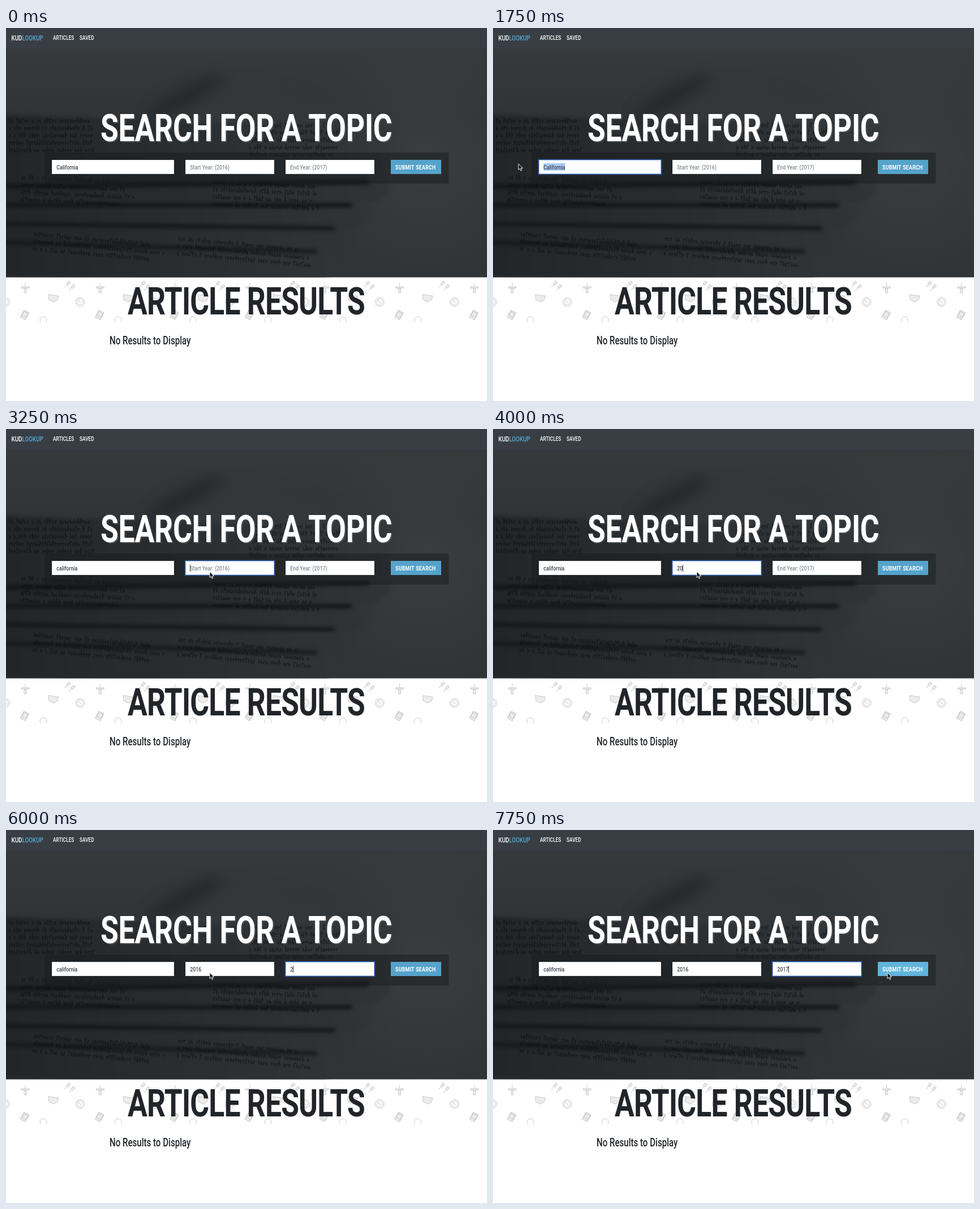
Write an HTML page with a canvas that moves like this. It is 850 px wide and 659 px high and loops after 8 s.

```html
<!DOCTYPE html>
<html lang="en">
<head>
<meta charset="utf-8">
<title>Article search</title>
<style>
html, body { margin: 0; width: 100%; height: 100%; overflow: hidden; background: #fff; }
canvas { display: block; width: 850px; height: 659px; }
</style>
</head>
<body>
<canvas id="stage" width="850" height="659"></canvas>
<script>
const W = 850, H = 659, LOOP = 8000, TICK = 250, BLINK = 500;
const NARROW = 0.765; // condensed setting shared by all text
const TAU = Math.PI * 2;
const stage = document.getElementById('stage').getContext('2d');

// A field gains focus, then its word is typed between "from" and "to".
const FIELDS = [
  { x: 81, w: 216, value: 'California', hint: '', word: 'california', focus: 1250, from: 2250, to: 2250 },
  { x: 317, w: 157, value: '', hint: 'Start Year: (2016)', word: '2016', focus: 3250, from: 3500, to: 4500 },
  { x: 494, w: 157, value: '', hint: 'End Year: (2017)', word: '2017', focus: 5000, from: 6000, to: 6750 }
];

const GLIDES = [
  { from: 500, to: 1250, x: 152, y: 246, size: 0.72 },
  { from: 1500, to: 1750, x: 45, y: 240, size: 0.72 },
  { from: 2250, to: 2750, x: 362.5, y: 249, size: 2 },
  { from: 2750, to: 3000, x: 360, y: 252, size: 0.72 },
  { from: 7250, to: 7750, x: 697, y: 252, size: 0.72 }
];

const mix = (a, b, k) => a + (b - a) * k;
const within = (t, a, b) => t >= a && t < b;

function ease(t, a, b) {
  const k = Math.min(1, Math.max(0, (t - a) / (b - a)));
  return k * k * (3 - 2 * k);
}

function seeded(seed) {
  return () => (seed = (seed * 16807) % 2147483647) / 2147483647;
}

function setFont(g, size, weight, spacing = 0) {
  g.font = `${weight} ${size}px Roboto, "Open Sans", sans-serif`;
  g.letterSpacing = spacing + 'px';
}

function text(g, str, x, y, size, color, weight = 500, spacing = 0) {
  g.save();
  g.translate(x, y);
  g.scale(NARROW, 1);
  setFont(g, size, weight, spacing);
  g.fillStyle = color;
  g.fillText(str, 0, 0);
  const width = g.measureText(str).width * NARROW;
  g.restore();
  return width;
}

// One paper layer between a left and a right edge, lit towards the right.
function sheet(g, left, right, reach, depth, light) {
  const fill = g.createLinearGradient(0, 0, reach, 0);
  fill.addColorStop(0, '#222629');
  fill.addColorStop(1, light);
  g.fillStyle = fill;
  g.beginPath();
  g.moveTo(-20, left);
  g.lineTo(reach, right);
  g.quadraticCurveTo(reach + 12, right + depth / 2, reach - 25, right + depth);
  g.lineTo(-20, left + depth);
  g.fill();
}

// Blurred print: rows of small strokes grouped into words.
function print(g, x, y, w, rows, tilt) {
  const rnd = seeded(Math.round(x * 31 + y * 17)), size = 9;
  g.save();
  g.translate(x, y);
  g.rotate(tilt);
  g.strokeStyle = 'rgba(10,12,14,.42)';
  g.lineWidth = 1.8;
  g.beginPath();
  for (let r = 0; r < rows; r++) {
    const end = w * mix(0.85, 1, rnd());
    for (let px = 0; px < end; px += size * (rnd() < 0.2 ? 1 : 0.5)) {
      const tall = size * (rnd() < 0.25 ? 0.9 : 0.6);
      g.moveTo(px, r * 13);
      g.lineTo(px, r * 13 - tall);
      g.lineTo(px + 3, r * 13 - tall * rnd());
    }
  }
  g.stroke();
  g.restore();
}

function photo(g) {
  g.save();
  g.beginPath();
  g.rect(0, 36, W, 404.5);
  g.clip();

  const sky = g.createLinearGradient(0, 36, 0, 440);
  sky.addColorStop(0, '#363a3d');
  sky.addColorStop(0.3, '#303437');
  sky.addColorStop(1, '#303437');
  g.fillStyle = sky;
  g.fillRect(0, 36, W, 405);
  const glow = g.createRadialGradient(740, 230, 10, 740, 230, 220);
  glow.addColorStop(0, 'rgba(66,70,73,.5)');
  glow.addColorStop(1, 'rgba(66,70,73,0)');
  g.fillStyle = glow;
  g.fillRect(400, 36, 450, 405);

  // far roll and its shadow
  g.filter = 'blur(10px)';
  g.fillStyle = '#33373a';
  g.beginPath();
  g.moveTo(240, 170);
  g.bezierCurveTo(300, 60, 420, 70, 690, 180);
  g.lineTo(640, 290);
  g.fill();
  g.fillStyle = '#262a2d';
  g.beginPath();
  g.ellipse(315, 122, 75, 17, -0.5, 0, TAU);
  g.fill();

  // stack, with a dark crease above each layer
  g.filter = 'blur(3px)';
  sheet(g, 152, 178, 655, 130, '#33373a');
  for (let i = 0; i < 4; i++) {
    const left = 280 + 33 * i, right = 272 + 41 * i, reach = 675 - 32 * i;
    sheet(g, left, right, reach, 36 + 8 * i, '#303437');
    g.strokeStyle = '#14171a';
    g.lineWidth = 9 - i;
    g.beginPath();
    g.moveTo(0, left);
    g.lineTo(reach * 0.95, right);
    g.stroke();
  }

  g.filter = 'blur(0.7px)';
  for (let band = 0; band < 3; band++) {
    for (let col = 0; col < 2; col++) {
      print(g, 6 + 22 * band + col * (425 - 85 * band), 168 + 100 * band + 8 * col,
        mix(165, 240, band / 2), 5 - band, 0.045 * band);
    }
  }
  g.restore();
}

function icon(g, x, y, turn, draw) {
  g.save();
  g.translate(x, y);
  g.rotate(turn);
  g.beginPath();
  draw();
  g.fill();
  g.stroke();
  g.restore();
}

function tile(g, x) {
  g.strokeStyle = '#cbcbcb';
  g.fillStyle = '#ececec';
  g.lineWidth = 1;
  icon(g, x + 34, 459, 0, () => { // lamp
    g.moveTo(0, -9);
    g.lineTo(0, -3);
    g.rect(-7, -2, 14, 2.5);
    g.rect(-2, 1, 4, 8);
  });
  for (let i = 0; i < 2; i++) { // brushes
    icon(g, x + 109 + 8 * i, 452 + 6 * i, 0.75, () => {
      g.rect(-2, -5, 4, 6);
      g.moveTo(0, 1);
      g.lineTo(0, 8);
    });
  }
  icon(g, x + 83, 477, 0.15, () => { // map
    g.moveTo(-9, -5);
    g.lineTo(9, -5);
    g.lineTo(8, 2);
    g.lineTo(2, 7);
    g.lineTo(-7, 4);
    g.closePath();
  });
  icon(g, x + 33, 507, 0.5, () => { // device
    g.rect(-5, -7, 10, 14);
    g.rect(-4, -5, 8, 8);
  });
  g.fillStyle = '#fff';
  icon(g, x + 131, 484, 0, () => g.arc(0, 0, 8, 0, TAU)); // gauge
  icon(g, x + 131, 484, 0.75, () => {
    g.arc(0, 0, 5.5, 0, TAU);
    g.moveTo(-5, 0);
    g.lineTo(3, 0);
  });
  icon(g, x + 66, 516, 0, () => g.arc(0, 0, 6, 0, TAU)); // bulb
}

function backdrop() {
  const page = document.createElement('canvas');
  page.width = W;
  page.height = H;
  const g = page.getContext('2d');
  g.fillStyle = '#fff';
  g.fillRect(0, 0, W, H);
  photo(g);

  g.fillStyle = '#383e44';
  g.fillRect(0, 0, W, 36);
  const used = text(g, 'KUD', 9.5, 22, 12.8, '#fff');
  text(g, 'LOOKUP', 9.5 + used, 22, 12.8, '#56a8d2');
  text(g, 'ARTICLES', 83, 21, 10.8, '#fff');
  text(g, 'SAVED', 130, 21, 10.8, '#fff');

  g.fillStyle = 'rgba(26,28,31,.5)';
  g.fillRect(68, 220, 714.5, 55);
  g.save();
  g.shadowColor = 'rgba(70,75,80,.9)';
  g.shadowOffsetX = g.shadowOffsetY = 2;
  g.shadowBlur = 1;
  text(g, 'SEARCH FOR A TOPIC', 167, 200, 67.5, '#fff', 700, -0.2);
  g.restore();

  g.save();
  g.beginPath();
  g.rect(0, 441, W, 79);
  g.clip();
  for (let k = -1; k < 7; k++) tile(g, k * 132.3);
  g.restore();
  text(g, 'ARTICLE RESULTS', 215, 506, 67.5, '#212529', 700, -1.05);
  text(g, 'No Results to Display', 183, 559, 19.7, '#212529');
  return page;
}

// Typing starts slowly and speeds up.
function typed(f, t) {
  if (t < f.from) return f.value;
  const k = Math.min(1, (t - f.from + TICK) / (f.to - f.from + TICK));
  return f.word.slice(0, Math.ceil(f.word.length * k * k));
}

function caretOn(f, t) {
  if (within(t, f.from, f.to)) return true;
  const since = t < f.from ? f.focus : f.to;
  return Math.floor((t - since) / BLINK) % 2 === 0;
}

function drawField(g, f, t, focused) {
  if (focused) {
    g.fillStyle = '#28498a';
    g.fillRect(f.x - 1.5, 231.5, f.w + 3, 28);
  }
  g.fillStyle = '#fff';
  g.fillRect(f.x, 233, f.w, 25);
  g.strokeStyle = focused ? '#9dbfea' : '#e6eaed';
  g.lineWidth = 1;
  g.strokeRect(f.x + 0.5, 233.5, f.w - 1, 24);

  const value = typed(f, t), x = f.x + 8.3, size = 11.5;
  const selected = focused && value && within(t, f.focus + BLINK, f.from);
  setFont(g, size, 500);
  const width = g.measureText(value).width * NARROW;
  if (selected) {
    g.fillStyle = '#a9cbf5';
    g.fillRect(x, 239, width, 13);
  }
  text(g, value || f.hint, x, 249.5, size, value ? '#40464c' : '#858c93');
  if (focused && !selected && caretOn(f, t)) {
    g.fillStyle = '#333';
    g.fillRect(Math.round(x + width), 240, 1, 12);
  }
}

function pointerAt(t) {
  const p = { x: 290, y: 184, size: 0.72 };
  for (const m of GLIDES) {
    const k = ease(t, m.from, m.to);
    for (const key in p) p[key] = mix(p[key], m[key], k);
  }
  return p;
}

function drawPointer(g, { x, y, size }) {
  g.save();
  g.translate(x, y);
  g.scale(size, size);
  g.fillStyle = '#111';
  g.strokeStyle = '#fff';
  g.lineWidth = 1.3;
  const arrow = new Path2D('M0 0V14.5L3.3 11.5L5.7 17L8 16L5.8 10.6H10.5Z');
  g.fill(arrow);
  g.stroke(arrow);
  g.restore();
}

const back = backdrop();

function draw(now) {
  const t = Math.floor((now % LOOP) / TICK) * TICK, g = stage;
  const active = FIELDS.filter(f => t >= f.focus).pop();
  const p = pointerAt(t);
  g.drawImage(back, 0, 0);
  for (const f of FIELDS) drawField(g, f, t, f === active);
  g.fillStyle = p.x > 680 ? '#61b4dd' : '#55a3cb';
  g.fillRect(680, 233, 89, 25);
  text(g, 'SUBMIT SEARCH', 688, 249.5, 11.5, '#fff', 700, 0.3);
  // the pointer hides while the topic is retyped
  if (t >= 500 && !within(t, 2250, 2500)) drawPointer(g, p);
  requestAnimationFrame(draw);
}
requestAnimationFrame(draw);
</script>
</body>
</html>
```
